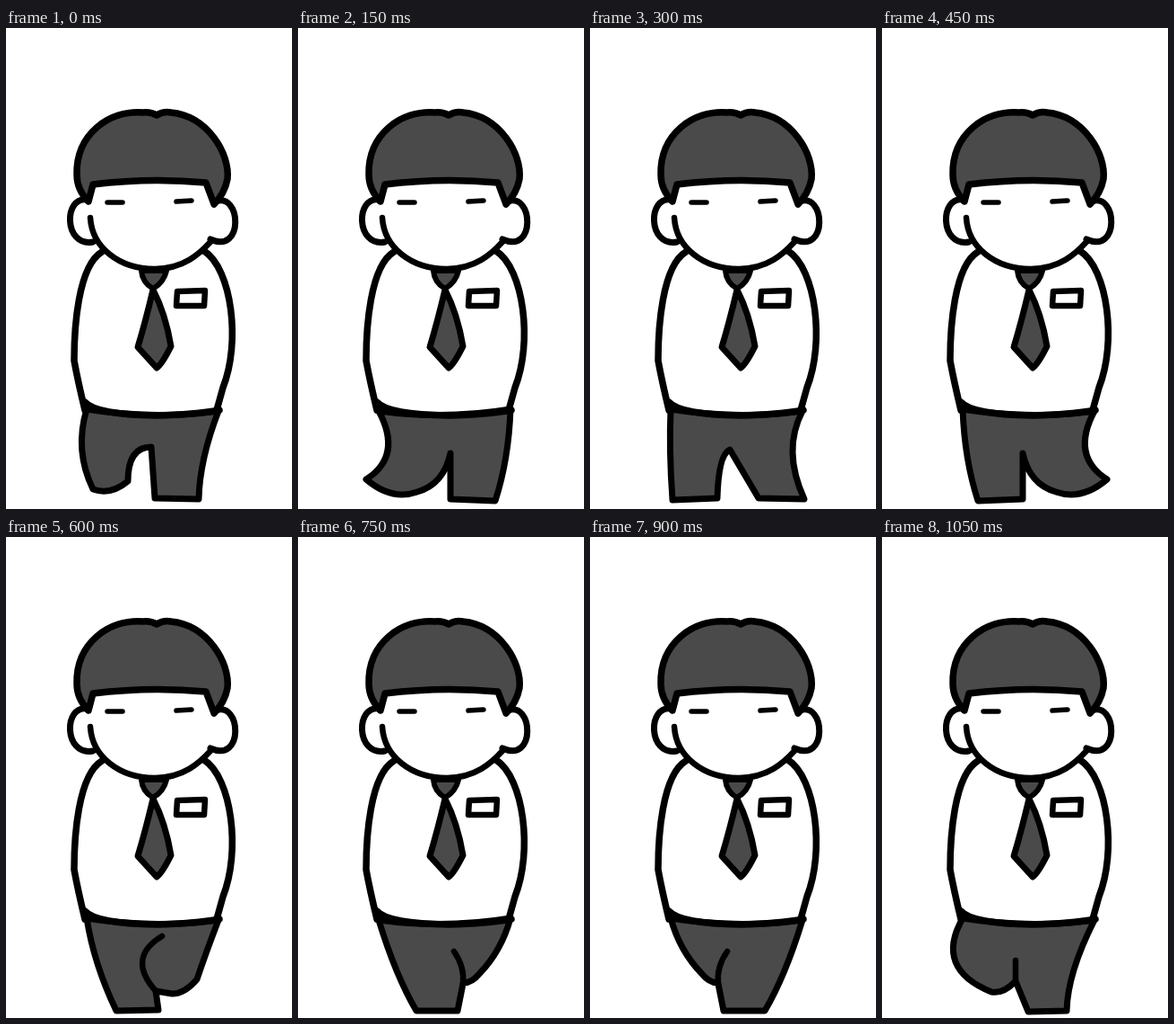
These frames come from a looping animation (319 px wide and 535 px high, 1200 ms). An HTML page with a canvas:

```html
<!DOCTYPE html>
<html lang="en">
<head>
<meta charset="utf-8">
<title>Office walk</title>
<style>
  html, body { margin: 0; width: 100%; height: 100%; overflow: hidden; background: #fff; }
  canvas { display: block; width: 319px; height: 535px; }
</style>
</head>
<body>
<canvas id="stage" width="319" height="535"></canvas>
<script>
const ctx = document.getElementById('stage').getContext('2d');
const GREY = '#4a4a4a';
const STEP = 150;
const HIP_L = [90, 424], HIP_R = [237, 426];
const MIRROR = HIP_L[0] + HIP_R[0];

const hair = 'M92,193Q79,180 79,163C78,118 115,91 153,94Q161,93 168,97Q176,92 184,94C225,98 250,140 247,168Q244,184 232,196L223,172Q160,166 97,174Z';
const face = 'M94,211C96,244 126,268 166,268C198,268 216,251 228,238';
const ears = 'M91,191C64,186 64,244 97,238M234,193C262,182 266,252 228,235';
const eyes = 'M113,194H130M190,193L207,192';
const sides = 'M107,249C80,265 76,335 76,370Q80,392 88,425M221,248C252,268 262,350 242,400L235,425';
const waist = 'M88,416Q100,430 168,431Q210,430 238,425';
const knot = 'M151,270H179Q176,283 164,290Q152,283 151,270Z';
const blade = 'M164,291Q156,325 147,355L168,378Q174,374 184,354Q178,318 164,291Z';
const badge = 'M191,293L222,292L221,309L190,309Z';

// A leg bends from hip past knee to toe, follows the sole to the heel, then
// rises to the crotch. bend: 0 and 1 bow the inseam either way, 0.5 is straight.
const leg = (knee, toe, heel, bend = 0.5) => ({ knee, toe, heel, bend });

const lift = {
  left: leg([76, 470], [97, 513], [136, 504], 0),
  right: leg([216, 480], [215, 524], [166, 523]),
  crotch: [162, 466]
};
const stand = {
  left: leg([88, 470], [92, 525], [142, 523], 0.1),
  right: leg([214, 470], [239, 524], [188, 523]),
  crotch: [156, 469]
};
const kick = {
  left: leg([92, 480], [107, 526], [157, 524]),
  right: leg([210, 476], [251, 502], [194, 516], 0.8),
  crotch: [157, 473]
};
const tuck = {
  left: leg([98, 475], [123, 527], [170, 526]),
  right: leg([222, 465], [213, 492], [185, 508]),
  crotch: [167, 505],
  crease: [134, 468, 174, 444]
};
const cross = {
  left: leg([100, 460], [124, 485], [142, 496]),
  right: leg([218, 488], [195, 527], [149, 527]),
  crotch: [143, 497],
  crease: [141, 478, 153, 461]
};
const swing = {
  left: leg([58, 480], [122, 506], [148, 495]),
  right: leg([207, 485], [206, 527], [163, 528]),
  crotch: [149, 494],
  crease: [149, 482, 149, 471]
};
const mirrored = pose => ({ ...pose, flip: true });
const walk = [lift, mirrored(kick), stand, kick, tuck, mirrored(cross), cross, swing];

const mix = (a, b, t) => a + (b - a) * t;

// Control point of the sole: a raised foot sags, a planted one is flat.
function sole({ toe, heel }) {
  const y = mix(toe[1], heel[1], 0.5);
  const sag = y < 520 ? Math.abs(toe[0] - heel[0]) * 0.3 : 0;
  return [mix(toe[0], heel[0], 0.5), y + sag];
}

function inseam({ heel, bend }, crotch) {
  return [mix(heel[0], crotch[0], bend), mix(crotch[1], heel[1], bend)];
}

function trousers({ left, right, crotch }) {
  const path = new Path2D();
  const curve = (ctrl, end) => path.quadraticCurveTo(...ctrl, ...end);
  path.moveTo(...HIP_L);
  curve(left.knee, left.toe);
  curve(sole(left), left.heel);
  curve(inseam(left, crotch), crotch);
  curve(inseam(right, crotch), right.heel);
  curve(sole(right), right.toe);
  curve(right.knee, HIP_R);
  curve([MIRROR / 2, 436], HIP_L);
  return path;
}

function draw(shape, width, fill) {
  const path = typeof shape === 'string' ? new Path2D(shape) : shape;
  if (fill) {
    ctx.fillStyle = fill;
    ctx.fill(path);
  }
  ctx.lineWidth = width;
  ctx.stroke(path);
}

function drawLegs(pose) {
  ctx.save();
  if (pose.flip) ctx.transform(-1, 0, 0, 1, MIRROR, 0);
  draw(trousers(pose), 7, GREY);
  if (pose.crease) draw(`M${pose.crotch}Q${pose.crease}`, 6.5);
  ctx.restore();
}

function render(time) {
  ctx.fillStyle = '#fff';
  ctx.fillRect(0, 0, 319, 535);
  ctx.strokeStyle = '#000';
  ctx.lineCap = ctx.lineJoin = 'round';

  drawLegs(walk[Math.floor(time / STEP) % walk.length]);
  draw(sides, 7.5);
  draw(waist, 7.5);
  draw(blade, 7, GREY);
  draw(knot, 6, GREY);
  draw(badge, 6.5);
  draw(ears, 7);
  draw(face, 6.5);
  draw(eyes, 5.5);
  draw(hair, 7.5, GREY);
}

const start = performance.now();
function tick() {
  render(performance.now() - start);
  requestAnimationFrame(tick);
}
tick();
</script>
</body>
</html>
```
